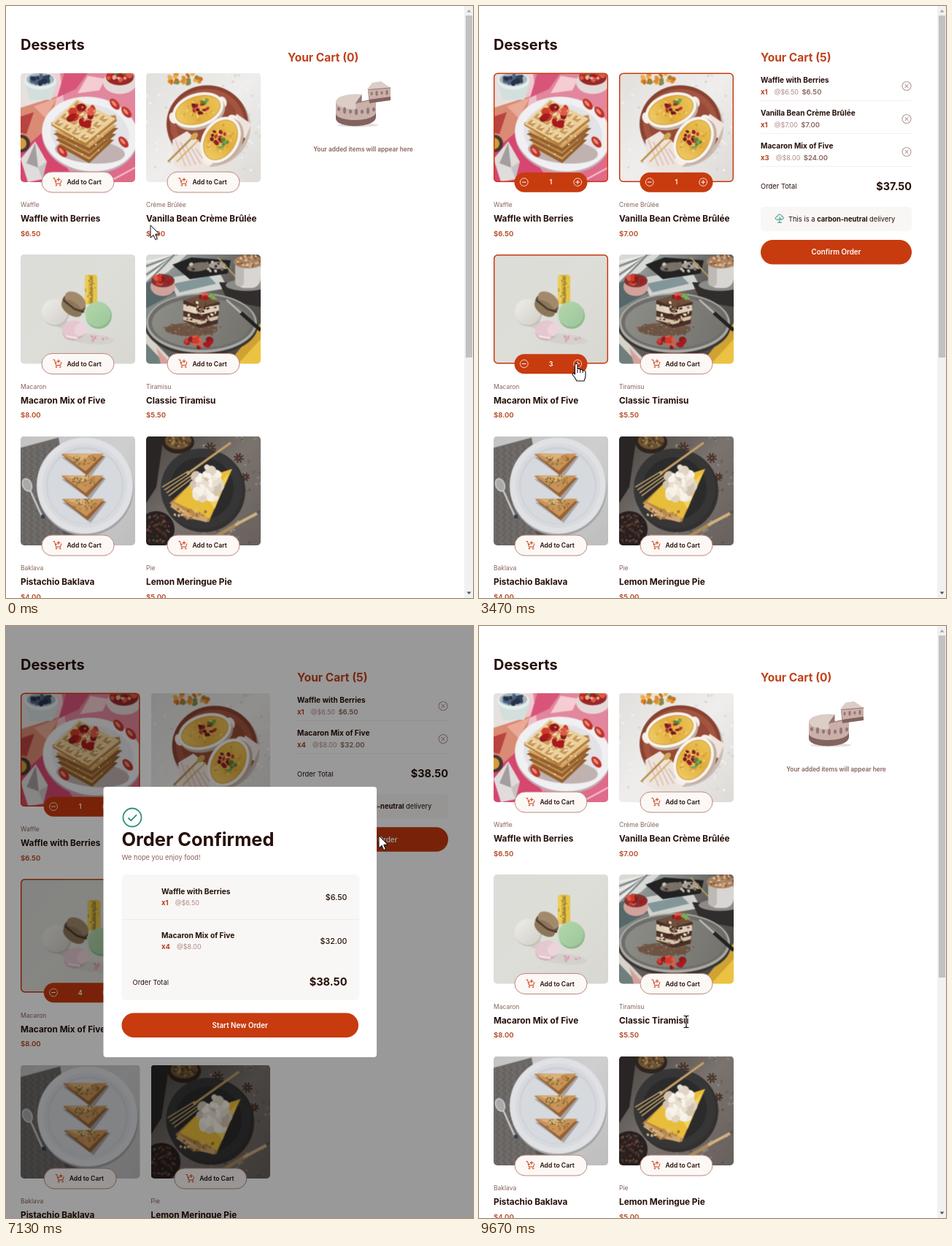
Write an HTML page with a canvas that moves like this. It is 640 by 810 pixels and loops after 9790 ms.

```html
<!DOCTYPE html>
<html lang="en">
<head>
<meta charset="utf-8">
<title>Desserts</title>
<style>
html, body { margin: 0; width: 100%; height: 100%; overflow: hidden; background: #fff; }
canvas { display: block; width: 640px; height: 810px; }
</style>
</head>
<body>
<canvas id="stage"></canvas>
<script>
const LOOP = 9790, W = 640, H = 810, PW = 157, PH = 150;
const RED = '#c73b0f', DARK = '#260f08', ROSE = '#87635a', MUTE = '#ad8a85', GREEN = '#2f8f7c';
const stage = document.getElementById('stage');
const dpr = window.devicePixelRatio || 1;
stage.width = W * dpr;
stage.height = H * dpr;
const main = stage.getContext('2d');
let c = main;

// ---------- drawing helpers ----------
function fillStroke(fill, stroke, lw = 1) {
  if (fill) { c.fillStyle = fill; c.fill(); }
  if (stroke) { c.strokeStyle = stroke; c.lineWidth = lw; c.stroke(); }
}
function ell(x, y, rx, ry, rot, fill, stroke, lw) {
  c.beginPath();
  c.ellipse(x, y, rx, ry, rot * Math.PI / 180, 0, 7);
  fillStroke(fill, stroke, lw);
}
const dot = (x, y, r, fill, stroke, lw) => ell(x, y, r, r, 0, fill, stroke, lw);
function trace(p) {
  c.beginPath();
  for (let i = 0; i < p.length; i += 2) c.lineTo(p[i], p[i + 1]);
}
function poly(fill, ...p) { trace(p); c.closePath(); fillStroke(fill); }
function line(col, lw, ...p) { trace(p); fillStroke(null, col, lw); }
function box(x, y, w, h, r, fill, stroke, lw) {
  c.beginPath();
  c.roundRect(x, y, w, h, r);
  fillStroke(fill, stroke, lw);
}
function text(s, x, y, size, weight, col, align = 'left') {
  c.font = `${weight} ${size}px Inter, "Open Sans", sans-serif`;
  c.textAlign = align;
  c.fillStyle = col;
  c.fillText(s, x, y);
  return c.measureText(s).width;
}
let seed = 1;
const rnd = () => (seed = seed * 16807 % 2147483647) / 2147483647;
function scatter(n, x, y, rx, ry, size, cols) {
  for (let i = 0; i < n; i++) {
    const a = rnd() * 6.28, d = Math.sqrt(rnd());
    ell(x + rx * d * Math.cos(a), y + ry * d * Math.sin(a), size * (.6 + rnd() * .6), size * (.5 + rnd() * .5),
      rnd() * 180, cols[i % cols.length]);
  }
}
function shade(x0, y0, x1, y1, ...cols) {
  const g = c.createLinearGradient(x0, y0, x1, y1);
  cols.forEach((k, i) => g.addColorStop(i / (cols.length - 1), k));
  return g;
}
function backdrop(...cols) {
  c.fillStyle = shade(0, 0, 157, 150, ...cols);
  c.fillRect(0, 0, PW, PH);
}
const BERRY = ['#a81a1c', '#cf3a2c', '#8f1a1c', '#dc5c45'];

// ---------- dessert pictures, each on a 157 x 150 field ----------
function waffle() {
  backdrop('#f0eeec', '#ec9db0', '#d85c80');
  poly('#e2879d', 54, 0, 120, 0, 157, 26, 157, 50, 60, 44);
  poly('#d85579', 60, 0, 92, 0, 76, 22, 50, 34);
  poly('#f4ccd2', 92, 4, 116, 8, 108, 24, 78, 28);
  poly('#e6e1df', 0, 0, 24, 0, 46, 36, 0, 52);
  poly('#d98b74', 0, 48, 50, 32, 36, 88, 12, 112, 0, 84);
  poly('#eba997', 18, 46, 50, 34, 34, 62);
  poly('#b9433f', 0, 60, 18, 54, 8, 84, 0, 82);
  poly('#d6466f', 0, 108, 32, 80, 76, 150, 0, 150);
  poly('#e0dcdb', 0, 118, 20, 94, 36, 122, 30, 146, 10, 150);
  poly('#a39da0', 8, 124, 20, 96, 24, 130);
  poly('#c7c1c2', 24, 130, 36, 122, 30, 146);
  poly('#e06a8a', 92, 150, 157, 116, 157, 150);
  line('#f4c9d2', 2, 120, 150, 157, 130);
  dot(1, 97, 12, '#453731');
  dot(0, 97, 8, '#d39b3a');
  poly('#d3dfdd', 5, 12, 50, 12, 42, 37, 13, 37);
  ell(27, 11, 22, 12, 0, '#e6eeed');
  ell(27, 9, 19, 9, 0, '#a5b6be');
  scatter(15, 27, 8, 15, 6, 4, ['#34425c', '#4f617d', '#26324a']);
  ell(136, 13, 23, 16, 0, '#e5d9d8');
  ell(136, 6, 19, 11, 0, '#932a2a');
  scatter(16, 136, 5, 16, 8, 4.5, BERRY);
  scatter(6, 134, 3, 14, 6, 3, ['#5d8442', '#efb19e']);
  ell(95, 87, 66, 51, 8, '#c3aab3');
  ell(95, 84, 66, 51, 8, '#f0eff1');
  ell(95, 83, 54, 40, 8, '#e3e2e7');
  ell(95, 108, 48, 16, 5, '#bfb2b0');
  for (let i = 3; i >= 1; i--) {
    const y = i * 8, s = i * 3;
    poly('#94602f', 42 + s, 76 + y, 80, 60 + y, 137 - s, 68 + y, 94, 100 + y);
    poly(i % 2 ? '#d4a363' : '#c08c4c', 43 + s, 72 + y, 80, 56 + y, 135 - s, 64 + y, 94, 95 + y);
    poly('#efd9ac', 46 + s, 70 + y, 80, 56 + y, 132 - s, 62 + y, 94, 90 + y);
  }
  const at = (i, j) => [42 + 35 * i + 47 * j, 70 - 34 * i + 26 * j];
  poly('#b5813f', 42, 72, 89, 101, 132, 66, 130, 58, 42, 68);
  poly('#ecd09b', ...at(0, 0), ...at(1, 0), ...at(1.05, 1.1), ...at(0, 1));
  for (let i = 0; i < 4; i++) for (let j = 0; j < 4; j++) {
    const p = i / 4 + .05, q = j / 4 + .05;
    poly('#c8975a', ...at(p, q), ...at(p + .16, q), ...at(p + .16, q + .16), ...at(p, q + .16));
    poly('#f5e4be', ...at(p + .05, q + .06), ...at(p + .16, q + .06), ...at(p + .16, q + .16));
  }
  scatter(13, 87, 59, 19, 13, 6.5, BERRY);
  scatter(9, 88, 55, 14, 9, 2.2, ['#ee9a80', '#c93327']);
  scatter(24, 90, 92, 35, 22, 1.2, ['#fbf2dc', '#b98346']);
  [[57, 108], [145, 54], [141, 95], [129, 43]].forEach(([x, y]) => {
    ell(x, y, 9, 5, 50, '#bf3329');
    ell(x - 1, y - 1, 5, 2, 50, '#e88c76');
  });
}

function ramekin(x, y, rx, ry, rot) {
  c.save();
  c.translate(x, y);
  c.rotate(rot * Math.PI / 180);
  for (const s of [-1, 1]) ell(s * (rx - 1), 0, 6, 8, 0, '#f5efe8');
  ell(1, 4, rx, ry, 0, '#c2aea1');
  ell(0, 0, rx, ry, 0, '#f8f4ee');
  ell(0, 0, rx - 4, ry - 4, 0, '#d39a34');
  ell(0, 0, rx - 5, ry - 5, 0, shade(-rx, 0, rx, 0, '#efcf69', '#e2ad3e', '#ecc659'));
  scatter(30, 0, 0, rx - 9, ry - 9, 1.6, ['#d69c34', '#f2d780']);
  c.restore();
}
function brulee() {
  backdrop('#e2e0dd', '#efeeec', '#dddad7');
  scatter(90, 78, 75, 95, 85, 2, ['#d9d5d1', '#f4f2f0']);
  scatter(28, 53, 8, 23, 9, 3.5, ['#e08c2c', '#c9701f', '#eeac4a', '#8a8a48']);
  ell(86, 74, 57, 55, 0, '#cbbcb3');
  ell(84, 70, 56, 53, 0, '#8a4331');
  ell(84, 70, 51, 48, 0, '#a45541');
  ell(84, 70, 43, 40, 0, '#964a37');
  poly('#eee4de', 36, 92, 56, 80, 96, 114, 86, 130, 62, 136, 38, 128);
  for (let i = 0; i < 6; i++) line('#d9bcb2', 1.5, 40 + i * 7, 92 + i * 3, 54 + i * 7, 128 - i);
  poly('#efe3dd', 124, 56, 144, 70, 136, 90, 116, 78);
  line('#b98d45', 2.5, 30, 122, 64, 88);
  line('#dab56b', 2, 42, 122, 72, 92);
  ell(66, 87, 6, 4, -45, '#cfa656');
  ramekin(71, 51, 36, 23, -18);
  ramekin(102, 92, 34, 25, -58);
  scatter(12, 73, 49, 11, 8, 3, ['#8f1f2a', '#b3333a', '#6f1722']);
  scatter(12, 99, 88, 10, 9, 3, ['#8f1f2a', '#b3333a', '#6f1722']);
  scatter(6, 80, 40, 6, 5, 3, ['#5b8436', '#7da352']);
  scatter(7, 106, 98, 7, 9, 3, ['#5b8436', '#7da352']);
}

function macaron() {
  backdrop('#dcdcd8', '#dedeD9', '#d8d7d2');
  ell(58, 96, 22, 6, 20, '#cfcdc7');
  ell(96, 116, 32, 7, 5, '#d3d1cb');
  box(88, 28, 17, 40, 4, '#d9b234');
  box(88, 28, 5, 40, 3, '#ebcd57');
  box(95, 30, 4, 37, 0, '#a98b37');
  box(99, 28, 6, 40, 3, '#e6c446');
  scatter(30, 96, 48, 7, 18, 1, ['#9b7b2a', '#f0da7c']);
  dot(48, 80, 18.5, '#bfbcb5');
  dot(47, 79, 18, shade(30, 60, 65, 95, '#efeeea', '#d2cfc8'));
  ell(73, 68, 17, 14, 35, '#66543f');
  ell(75, 63, 16, 10, 35, '#a38a6c');
  ell(70, 74, 16, 9, 35, '#8b7659');
  line('#4b3a2b', 2.5, 59, 63, 74, 75, 87, 79);
  dot(107, 84, 18, '#8db58a');
  dot(106, 82, 17.5, shade(90, 65, 122, 100, '#b4d6ab', '#9cc79b'));
  ell(73, 105, 16, 13, -15, '#d5b2bb');
  ell(72, 103, 15, 12, -15, '#e4c7cf');
  ell(82, 103, 8, 9, 25, '#ecd5da');
  line('#f3e4e7', 2.5, 62, 112, 78, 115);
  scatter(10, 106, 114, 12, 5, 2.4, ['#dbaab7', '#e6c9d0', '#cf98a6']);
}

function tiramisu() {
  backdrop('#a9b7b7', '#615f5c', '#45403c');
  poly('#d9dad6', 0, 0, 56, 0, 30, 24, 0, 40);
  for (let i = 0; i < 6; i++) line(i % 2 ? '#7d8687' : '#efeeea', 2.5, 0, 10 + i * 6, 44 - i, 0);
  poly('#57686b', 0, 40, 22, 26, 44, 50, 0, 74);
  poly('#d0d2ce', 32, 32, 98, 20, 112, 46, 42, 58);
  poly('#83979a', 38, 40, 86, 30, 96, 40, 46, 52);
  poly('#232223', 36, 14, 62, 4, 116, 8, 112, 26, 60, 34);
  ell(72, 17, 16, 6, -8, '#77706a');
  ell(98, 15, 12, 5, 0, '#a69f95');
  scatter(16, 82, 17, 28, 7, 2.5, ['#c7c0b5', '#3d3632', '#8a6f59']);
  poly('#302d2c', 100, 38, 157, 40, 157, 72, 112, 64);
  line('#b79a63', 2, 98, 4, 126, 34);
  ell(138, 42, 29, 8, 0, '#8d8b88');
  box(122, 6, 35, 40, 13, '#d8d5d2');
  box(122, 6, 12, 38, 9, '#bdb9b5');
  ell(140, 10, 20, 9, 0, '#a8805e');
  scatter(40, 142, 9, 18, 8, 2, ['#c9a680', '#80543a', '#dcbd98']);
  ell(23, 44, 17, 13, 0, '#d3a19b');
  ell(23, 36, 16, 9, 0, '#803431');
  scatter(14, 23, 35, 13, 7, 3.5, BERRY);
  poly('#cfa233', 112, 150, 157, 94, 157, 150);
  poly('#ecc243', 126, 150, 157, 116, 157, 150);
  poly('#d7d2ca', 0, 108, 40, 150, 0, 150);
  poly('#6f7f7c', 0, 122, 26, 150, 0, 150);
  poly('#d7a09b', 14, 128, 34, 150, 20, 150);
  ell(76, 98, 77, 41, 0, '#3a3633');
  ell(76, 94, 76, 41, 0, '#a9a9a3');
  ell(76, 93, 73, 38, 0, '#6e6d69');
  ell(76, 94, 68, 34, 0, shade(10, 70, 140, 120, '#8d8d87', '#74736e'));
  ell(62, 103, 36, 9, 0, '#6f5444');
  scatter(90, 64, 101, 42, 12, 1.2, ['#66483a', '#7b5845', '#84817a']);
  poly('#4a3026', 51, 63, 78, 55, 101, 66, 98, 95, 74, 101, 51, 91);
  poly('#e0d0b9', 51, 68, 74, 74, 100, 69, 100, 77, 74, 83, 51, 77);
  poly('#d5c3aa', 51, 85, 74, 90, 99, 84, 98, 89, 74, 96, 51, 90);
  poly('#70503c', 52, 63, 78, 55, 101, 65, 75, 72);
  scatter(46, 75, 79, 23, 17, 2, ['#eadcc8', '#55382c', '#82634f', '#3f271e']);
  scatter(5, 80, 59, 8, 4, 4, BERRY);
  scatter(6, 91, 58, 6, 4, 3, ['#648f48', '#83ab5b']);
  scatter(17, 72, 120, 18, 8, 4.5, BERRY);
  line('#bcbcb7', 2.5, 110, 62, 132, 82);
  line('#222', 5, 130, 80, 157, 104);
}

function baklava() {
  backdrop('#c3c3c3', '#cfcfcf', '#bdbdbe');
  poly('#6c6866', 0, 16, 52, 2, 62, 60, 90, 150, 0, 150);
  for (let y = 0; y < 34; y++) for (let x = 0; x < 18; x++) {
    const px = x * 4.5 + y % 2 * 2, py = 17 + y * 4;
    if (px < 50 + (py - 17) * .28) dot(px, py - px * .1, .9, x % 2 ? '#595553' : '#807c7a');
  }
  poly('#575351', 54, 112, 72, 130, 90, 150, 62, 150);
  dot(89, 71, 66, '#a2a2a4');
  dot(88, 68, 66, '#dfe1e4');
  dot(88, 68, 58, '#d8dade');
  dot(88, 68, 53, '#cdd0d5');
  dot(88, 69, 51, '#d6d9dd');
  line('#c9c9c9', 2.5, 13, 74, 30, 112);
  ell(9, 67, 6, 9, -22, '#aaa', '#dcdcdc', 1.2);
  box(28, 108, 5, 5, 1, '#333d52');
  for (const [x, y] of [[86, 22], [86, 52], [87, 84]]) {
    poly('#a3a3a6', x - 30, y + 7, x + 31, y + 6, x + 9, y + 35);
    poly('#9d6738', x - 30, y + 3, x + 29, y + 5, x + 5, y + 32);
    poly('#c99459', x - 30, y + 2, x + 28, y + 2, x + 3, y + 26);
    poly('#dcb27a', x - 24, y + 3, x + 14, y + 2, x - 3, y + 12);
    line('#8e5a2e', 1, x - 24, y + 8, x + 4, y + 29, x + 25, y + 7);
    scatter(46, x + 1, y + 10, 16, 8, 1.2, ['#7b7340', '#955f30', '#b0803f', '#676a35']);
  }
}

function anise(x, y, r) {
  for (let i = 0; i < 8; i++) {
    const a = i * Math.PI / 4 + .3;
    line('#3d2820', 1.8, x, y, x + r * Math.cos(a), y + r * Math.sin(a));
  }
  dot(x, y, 1.5, '#8d5c3c');
}
function pie() {
  backdrop('#484341', '#7a736e', '#67605c');
  poly('#282524', 0, 0, 24, 0, 14, 70, 0, 92);
  scatter(150, 110, 70, 75, 95, 2.2, ['#858079', '#68625e', '#928b85', '#58524f']);
  ell(44, 8, 22, 16, 0, '#2e241e');
  ell(44, 6, 18, 12, 0, '#6a5234');
  scatter(34, 44, 6, 16, 10, 2, ['#a4834f', '#4b3725', '#81643e']);
  dot(14, 128, 25, '#262020');
  scatter(80, 14, 128, 21, 21, 2, ['#523329', '#37251f', '#6c4a3d']);
  anise(88, 16, 8);
  anise(127, 30, 7);
  anise(110, 90, 10);
  anise(136, 56, 6);
  ell(79, 75, 57, 57, 0, '#34302f');
  ell(76, 72, 56, 55, 0, '#373637');
  ell(76, 72, 44, 43, 0, '#2b2b2c');
  line('#c5a067', 3, 56, 52, 88, 29, 116, 9);
  for (let i = 0; i < 4; i++) line('#c9a86f', 1.5, 58 + i * 2, 48 + i * 3, 22 + i * 3, 70 + i * 4);
  poly('#b98744', 32, 92, 62, 64, 118, 45, 86, 118, 58, 113);
  poly('#e8bd39', 38, 90, 64, 62, 118, 45, 87, 113);
  poly('#f2d35a', 84, 84, 114, 50, 94, 100);
  line('#cfa672', 7, 35, 94, 54, 107, 84, 115);
  scatter(26, 59, 106, 25, 7, 2.2, ['#b98850', '#e0be8d', '#9c6b38']);
  scatter(26, 82, 66, 20, 24, 8, ['#efe8dc', '#e0d4c4', '#f7f1e7', '#d2c4b1']);
  scatter(18, 84, 60, 17, 18, 5, ['#f9f4eb', '#e8ded0']);
  line('#a98a5b', 5, 94, 139, 126, 120);
  line('#d0b181', 4, 122, 122, 152, 106);
}

// a slight blur gives the pictures a photographic softness
function bake(draw) {
  const cv = document.createElement('canvas');
  cv.width = PW * 2;
  cv.height = PH * 2;
  c = cv.getContext('2d');
  c.scale(2, 2);
  draw();
  c.setTransform(1, 0, 0, 1, 0, 0);
  c.filter = 'blur(1.2px)';
  c.drawImage(cv, 0, 0);
  c = main;
  return cv;
}
const ITEMS = [
  ['Waffle', 'Waffle with Berries', 6.5, waffle],
  ['Crème Brûlée', 'Vanilla Bean Crème Brûlée', 7, brulee],
  ['Macaron', 'Macaron Mix of Five', 8, macaron],
  ['Tiramisu', 'Classic Tiramisu', 5.5, tiramisu],
  ['Baklava', 'Pistachio Baklava', 4, baklava],
  ['Pie', 'Lemon Meringue Pie', 5, pie]
].map(([kind, name, price, draw]) => ({ kind, name, price, pic: bake(draw) }));
const usd = v => '$' + v.toFixed(2);

function picture(pic, x, y, w, h, r) {
  c.save();
  c.beginPath();
  c.roundRect(x, y, w, h, r);
  c.clip();
  c.drawImage(pic, x, y, w, h);
  c.restore();
}

// ---------- timeline ----------
const PATH = [
  [0, 198, 300], [200, 198, 300], [800, 112, 241], [1200, 112, 241], [1800, 262, 243], [2060, 262, 243],
  [2400, 100, 489], [2600, 100, 489], [2930, 133, 489], [3670, 133, 489], [4470, 586, 154], [5200, 586, 154],
  [6070, 517, 274], [6530, 511, 287], [7650, 511, 287], [8400, 284, 541], [LOOP, 284, 541]
];
function pointer(t) {
  const i = PATH.findIndex(k => k[0] > t), [t0, x0, y0] = PATH[i - 1], [t1, x1, y1] = PATH[i];
  const p = (t - t0) / (t1 - t0), e = p * p * (3 - 2 * p);
  return { x: x0 + (x1 - x0) * e, y: y0 + (y1 - y0) * e };
}
const between = (t, a, b) => t >= a && t < b;
function quantities(t) {
  if (t >= 9200) return [0, 0, 0, 0, 0, 0];
  const mac = [2530, 3070, 3330, 3730].filter(k => t >= k).length;
  return [+(t >= 930), +between(t, 1930, 5070), mac, 0, 0, 0];
}
const over = (m, x, y, w, h) => m.x >= x && m.x <= x + w && m.y >= y && m.y <= y + h;

// ---------- page parts ----------
function trolley(x, y) {
  line(RED, 1, x - 6, y - 5, x - 4, y - 5, x - 2, y + 2.5, x + 4, y + 2.5, x + 5.5, y - 2);
  line(RED, 1, x - 3, y - 1, x - .5, y - 1);
  line(RED, 1, x + 1.5, y - 5.5, x + 1.5, y - .5);
  line(RED, 1, x - 1, y - 3, x + 4, y - 3);
  dot(x - 1.5, y + 4.7, .9, null, RED, .8);
  dot(x + 3.8, y + 4.7, .9, null, RED, .8);
}
function stepper(x, y, plus) {
  dot(x, y, 5.4, null, '#f6d8cc', 1);
  line('#fff', 1, x - 2.8, y, x + 2.8, y);
  if (plus) line('#fff', 1, x, y - 2.8, x, y + 2.8);
}
function card(item, x, y, w, h, n, m) {
  const bx = x + w / 2 - 50, by = y + h;
  picture(item.pic, x, y, w, h, 5);
  if (n) {
    box(x + .7, y + .7, w - 1.4, h - 1.4, 5, null, RED, 1.5);
    box(bx, by - 13.3, 100, 27, 13.5, RED);
    stepper(bx + 13.3, by, false);
    stepper(bx + 86.7, by, true);
    text(n, bx + 50, by + 3.2, 9, 600, '#fff', 'center');
  } else {
    const hot = m && over(m, bx, by - 14, 100, 28);
    box(bx + .5, by - 14, 99, 28, 14, '#fcf8f6', hot ? RED : '#b9897c', 1);
    trolley(bx + 22, by - .5);
    text('Add to Cart', bx + 35, by + 3.2, 8.6, 600, DARK);
  }
  text(item.kind, x, by + 34, 8.5, 400, ROSE);
  text(item.name, x, by + 54.3, 11.8, 700, DARK);
  text(usd(item.price), x, by + 73.5, 9.6, 600, '#b5431f');
}
function cake() {
  const body = '#c9b0a8', deep = '#83625f', top = '#dccdc6', drip = '#94767a';
  ell(482, 163, 28, 2.5, 0, '#e5dedb');
  c.beginPath();
  c.moveTo(452, 131);
  c.lineTo(452, 154);
  c.bezierCurveTo(453, 168, 506, 168, 507, 152);
  c.lineTo(507, 129);
  fillStroke(deep);
  c.beginPath();
  c.moveTo(452, 131);
  c.lineTo(452, 148);
  c.bezierCurveTo(456, 159, 503, 159, 507, 146);
  c.lineTo(507, 128);
  fillStroke(body);
  ell(479.5, 131, 27.5, 10.5, 0, top);
  poly('#fff', 487.5, 130, 487.5, 118, 512, 118, 512, 126.5);
  poly(drip, 479, 133, 487.5, 121, 487.5, 131);
  poly(body, 479, 133, 507, 127, 507, 146, 481, 152);
  line(drip, 1.2, 479, 133, 507, 127);
  for (let i = 0; i < 7; i++) ell(456 + i * 8, 141 + 4 * Math.sin(i * .5), 2, 2.8 + i % 2 * 1.6, 0, drip);
  poly(deep, 496, 116, 527, 112, 527, 129, 498, 133);
  poly(body, 496, 114, 527, 111, 527, 124, 498, 128);
  poly(top, 495, 114, 502, 105, 514, 103, 527, 112);
  line(drip, 1.2, 496, 114.5, 527, 112);
  for (let i = 0; i < 4; i++) ell(501 + i * 7, 120 - i * .6, 1.6, 2.4 + i % 2, 0, drip);
}
function tree(x, y) {
  c.beginPath();
  c.moveTo(x - 1, y + 1);
  c.bezierCurveTo(x - 7, y + 3, x - 7, y - 3, x - 3.5, y - 3);
  c.bezierCurveTo(x - 3, y - 7, x + 3, y - 7, x + 3, y - 3.5);
  c.bezierCurveTo(x + 7, y - 3, x + 6, y + 2, x + 1, y + 1);
  fillStroke('#e0efeb', GREEN, 1);
  line(GREEN, 1, x, y - 2, x, y + 5);
  line(GREEN, 1, x - 3, y + 5, x + 3, y + 5);
  line(GREEN, 1, x, y + 1, x + 2, y - 1);
}
function amount(n, price, x, y) {
  x += text('x' + n, x, y, 9.6, 700, '#b5431f') + 9;
  return x + text('@' + usd(price), x, y, 9, 400, MUTE) + 4.5;
}
function pill(label, x, y, w, hot) {
  box(x, y, w, 33.5, 16.7, hot ? '#952c0c' : RED);
  text(label, x + w / 2, y + 20.3, 9.8, 600, '#fff', 'center');
}
function cart(x, rows, qty, total, m) {
  text(`Your Cart (${qty.reduce((a, b) => a + b)})`, x, 76.3, 15.5, 700, '#c0431b');
  if (!rows.length) {
    cake();
    text('Your added items will appear here', x + 103.5, 199, 8.35, 600, ROSE, 'center');
    return;
  }
  rows.forEach((k, i) => {
    const y = 101.5 + i * 45, { name, price } = ITEMS[k];
    text(name, x, y + 3.6, 10.1, 700, DARK);
    text(usd(price * qty[k]), amount(qty[k], price, x, y + 19.5), y + 19.5, 9.5, 600, ROSE);
    const hot = m && Math.hypot(m.x - x - 200, m.y - y - 8) < 7, col = hot ? DARK : '#b9a29c';
    dot(x + 200, y + 8, 6, null, col, 1.2);
    line(col, 1.1, x + 197.7, y + 5.7, x + 202.3, y + 10.3);
    line(col, 1.1, x + 197.7, y + 10.3, x + 202.3, y + 5.7);
    line('#f3efed', 1, x, y + 28, x + 207, y + 28);
  });
  const y = 112.3 + rows.length * 44.8;
  text('Order Total', x, y + 3.6, 9.4, 400, DARK);
  text(usd(total), x + 207, y + 5.2, 14.4, 700, DARK, 'right');
  box(x, y + 28, 207, 33, 5, '#f9f7f5');
  tree(x + 26, y + 44.5);
  let tx = x + 38;
  tx += text('This is a ', tx, y + 48, 9.4, 400, DARK);
  tx += text('carbon-neutral', tx, y + 48, 9.4, 700, DARK);
  text(' delivery', tx, y + 48, 9.4, 400, DARK);
  pill('Confirm Order', x, y + 73.4, 207, m && over(m, x, y + 74, 207, 33));
}
function scrollbar() {
  c.fillStyle = '#f1f1f1';
  c.fillRect(628, 0, 12, H);
  c.fillStyle = '#c1c1c1';
  c.fillRect(630, 13, 9, 468);
  poly('#a3a3a3', 631.5, 8.5, 637.5, 8.5, 634.5, 5);
  poly('#505050', 631.5, 801.5, 637.5, 801.5, 634.5, 805);
}
function modal(rows, qty, total, thumbs, m) {
  c.fillStyle = 'rgba(0,0,0,.4)';
  c.fillRect(0, 0, W, H);
  box(133.5, 220, 374.5, 370, 4, '#fff');
  dot(173, 262, 12.5, null, GREEN, 1.8);
  line(GREEN, 1.8, 167.5, 262.5, 171.3, 266.2, 179, 258.3);
  text('Order Confirmed', 158.5, 301, 25.4, 700, DARK);
  text('We hope you enjoy food!', 158.5, 320, 9.2, 400, ROSE);
  box(158.5, 340, 326, 172, 6, '#f9f7f5');
  rows.forEach((k, i) => {
    const y = 371 + i * 60, { name, price, pic } = ITEMS[k];
    if (thumbs) picture(pic, 173, y - 15, 30, 29.5, 3);
    text(name, 213, y - 3.7, 10.2, 700, DARK);
    amount(qty[k], price, 213, y + 11.2);
    text(usd(price * qty[k]), 467.5, y + 4, 10.7, 500, DARK, 'right');
  });
  line('#efeae7', 1, 159, 401.5, 484, 401.5);
  text('Order Total', 173.5, 491, 9.4, 400, DARK);
  text(usd(total), 467.5, 492, 14.6, 700, DARK, 'right');
  pill('Start New Order', 158.5, 529.5, 324.5, over(m, 159, 530, 324, 33));
}
function cursor(m, kind) {
  c.save();
  c.translate(m.x, m.y);
  c.lineJoin = 'round';
  if (kind === 'beam') {
    for (const [col, lw] of [['#fff', 2.5], ['#111', 1.2]]) {
      line(col, lw, -3.5, -7.5, -1, -7.5, 0, -6.5, 1, -7.5, 3.5, -7.5);
      line(col, lw, 0, -7, 0, 7.5);
      line(col, lw, -3.5, 8.5, -1, 8.5, 0, 7.5, 1, 8.5, 3.5, 8.5);
    }
  } else if (kind === 'hand') {
    c.beginPath();
    c.moveTo(-1.5, 13);
    c.lineTo(-1.5, 2);
    c.bezierCurveTo(-1.5, -.5, 2, -.5, 2, 2);
    c.lineTo(2, 8);
    c.bezierCurveTo(3, 6.5, 5.5, 7, 5.7, 9);
    c.bezierCurveTo(7, 7.5, 9, 8.3, 9.2, 10);
    c.bezierCurveTo(11, 9, 13, 10, 13, 12);
    c.lineTo(13, 17);
    c.quadraticCurveTo(13, 20, 11, 24);
    c.lineTo(1, 24);
    c.quadraticCurveTo(-1, 20, -4, 16.5);
    c.bezierCurveTo(-6, 13, -3, 12, -1.5, 15);
    c.closePath();
    fillStroke('#fff', '#111', 1.1);
    for (const x of [2, 5.7, 9.2]) line('#111', 1, x, 9, x, 13);
  } else {
    c.shadowColor = 'rgba(0,0,0,.3)';
    c.shadowBlur = 2;
    c.shadowOffsetX = c.shadowOffsetY = 1;
    poly('#fff', 0, 0, 0, 17, 4, 13.3, 6.7, 19.5, 9.3, 18.4, 6.7, 12.3, 12, 12);
    c.shadowColor = 'transparent';
    fillStroke(null, '#111', 1);
  }
  c.restore();
}

function render(t) {
  const open = between(t, 7130, 9200), m = pointer(t), qty = quantities(t);
  const rows = [0, 1, 2].filter(k => qty[k]);
  const total = rows.reduce((s, k) => s + ITEMS[k].price * qty[k], 0);
  const w = open ? 163.5 : PW, h = open ? 155.5 : 149.5, step = open ? 178.5 : 172;
  const hover = open ? null : m;
  c.setTransform(dpr, 0, 0, dpr, 0, 0);
  c.fillStyle = '#fff';
  c.fillRect(0, 0, W, H);
  text('Desserts', 20, 60, 20, 700, DARK);
  ITEMS.forEach((item, i) => {
    const row = i >> 1;
    card(item, 20 + (i % 2) * step, 91.5 + row * (h + 99), w, h, qty[i], hover);
  });
  cart(open ? 399 : 386, rows, qty, total, hover);
  if (open) modal(rows, qty, total, t >= 7270, m);
  else scrollbar();
  const hand = between(t, 2930, 3670) || between(t, 4430, 5240);
  cursor(m, t >= 8370 ? 'beam' : hand ? 'hand' : 'arrow');
}
function tick() {
  render(performance.now() % LOOP);
  requestAnimationFrame(tick);
}
tick();
</script>
</body>
</html>
```
